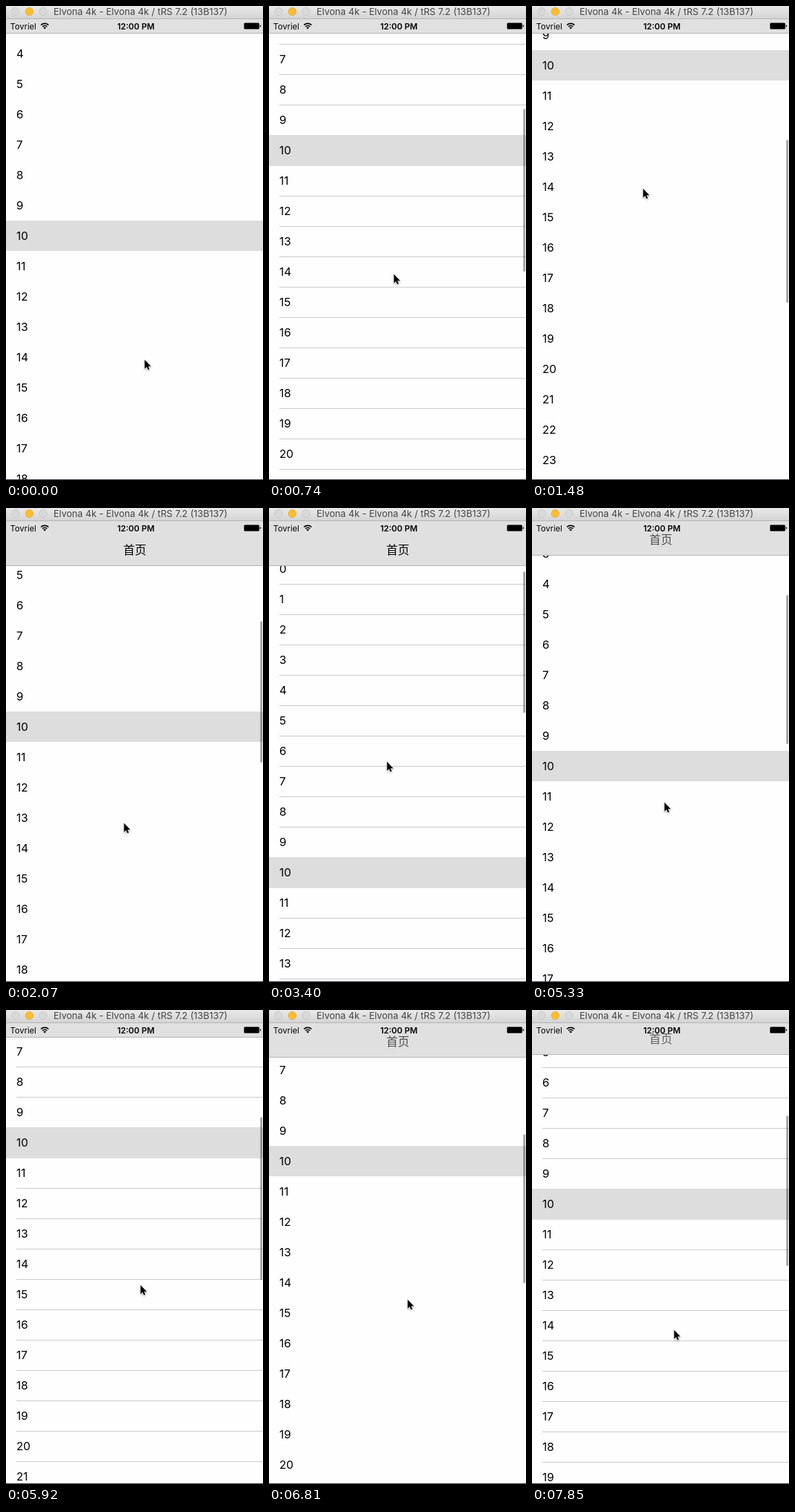
Write an HTML page that moves like this. It is 373 px wide and 687 px high and loops after 8 s.

```html
<!DOCTYPE html>
<html lang="zh">
<head>
<meta charset="utf-8">
<title>List with hiding bar</title>
<style>
  html, body { margin: 0; width: 100%; height: 100%; overflow: hidden; background: #fefefe; }
  body { position: relative; font-family: Inter, Roboto, sans-serif; color: #000; }
  body > *, .row, .home { position: absolute; }
  .row { left: 0; width: 373px; height: 44px; padding-left: 15px; box-sizing: border-box;
         font-size: 16.5px; line-height: 44px; }
  .row.on { background: #ddd; }
  .lined .row::after { content: ""; position: absolute; left: 15px; right: 0; top: 44px;
                       height: 1px; background: #c9c9cb; }
  .lined .row.on { height: 45px; }
  .lined .row.on::after { display: none; }
  #list { left: 0; top: 0; }
  #thumb { left: 369px; top: 0; width: 3px; border-radius: 1.5px; background: rgba(0,0,0,.35); }
  #bar { left: 0; top: -4px; width: 373px; height: 88px; background: #e0e0e0;
         box-sizing: border-box; border-bottom: 1px solid #b2b2b2; }
  .home { left: 0; width: 374px; top: 53px; text-align: center;
          font: 400 16.7px/22px "Noto Sans CJK SC", "Noto Sans CJK", sans-serif; }
  .status { top: 20px; line-height: 19px; font-size: 12px; white-space: nowrap; }
  .clock { left: 138.5px; width: 100px; text-align: center; font-weight: 600; }
  .window { left: 0; top: 0; width: 373px; height: 19px; box-sizing: border-box;
            background: linear-gradient(#e9e9e9, #d4d4d4); border-bottom: 1px solid #b4b4b4; }
  .name { left: 69px; top: 0; line-height: 17px; font-size: 13.5px; color: #444; white-space: nowrap; }
  .edge { left: 0; top: 686px; width: 373px; height: 1px; background: #33333b; }
  svg { left: 0; top: 0; overflow: visible; }
</style>
</head>
<body>
<div id="list"></div>
<div id="thumb"></div>
<div id="bar"><div class="home" id="home">首页</div></div>
<div class="window"></div>
<div class="name">Elvona 4k - Elvona 4k / tRS 7.2 (13B137)</div>
<div class="status" style="left:6px">Tovriel</div>
<div class="status clock">12:00 PM</div>
<div class="edge"></div>
<svg width="373" height="40">
  <g fill="#d9d9d9" stroke="#c2c2c2" stroke-width=".8">
    <circle cx="13.8" cy="8" r="5.6"/>
    <circle cx="33.8" cy="8" r="5.6" fill="#fdbe2f" stroke="#e2a224"/>
    <circle cx="53.8" cy="8" r="5.6"/>
  </g>
  <g fill="none" stroke="#000" stroke-width="1.6">
    <path d="M50.7 27.6a8 8 0 0 1 11 0M52.8 29.9a5 5 0 0 1 6.8 0"/>
    <path d="M56.2 33.6l-2-2.1a3 3 0 0 1 4 0z" fill="#000" stroke="none"/>
  </g>
  <rect x="345.5" y="24.5" width="22" height="9" rx="1.6" stroke="#666" stroke-width=".7"/>
  <path d="M368.6 27.3q1.5 .4 1.5 1.7t-1.5 1.7z"/>
</svg>
<svg id="arrow" width="12" height="18">
  <path d="M0 0V14L3.2 11L5.2 15.8L7.5 14.8L5.5 10.2H9.8Z" transform="translate(.3 .8) scale(.92)"
        stroke="#fff" stroke-width="1.4" paint-order="stroke"
        style="filter:drop-shadow(0 1px 1px rgba(0,0,0,.35))"/>
</svg>
<script>
const LOOP = 8000, TICKS = 54, ROW = 44, ROWS = 40, MARK = 10, BOTTOM = 687;

// turning points: tick, top of the marked row, pointer x, pointer y
const KEYS = [
  [0, 311, 201, 512],
  [10, 64, 161, 264],
  [14, 295, 171, 456],
  [23, 506.5, 171, 367],
  [28, 524, 171, 367],
  [32, 524, 187, 446],
  [40, 170.5, 195, 398],
  [44, 160, 198, 388],
  [50, 302, 206, 506],
  [51, 302, 206, 506],
  [53, 259.5, 206, 463]
];

const el = id => document.getElementById(id);
const list = el('list'), thumb = el('thumb'), bar = el('bar'), home = el('home'), arrow = el('arrow');
const moveTo = (e, x, y) => e.style.transform = `translate(${x}px, ${y}px)`;
const ramp = (t, from, to) => Math.min(1, Math.max(0, (t - from) / (to - from)));

for (let i = 0; i < ROWS; i++) {
  const row = document.createElement('div');
  row.className = i === MARK ? 'row on' : 'row';
  row.style.top = i * ROW + 'px';
  row.textContent = i;
  list.append(row);
}

function slope(n, c) {
  const a = KEYS[n], b = KEYS[n + 1];
  return a && b ? (b[c] - a[c]) / (b[0] - a[0]) : 0;
}

// flat at turning points, flowing through the others
function tangent(n, c) {
  const a = slope(n - 1, c), b = slope(n, c);
  return a * b > 0 ? 2 * a * b / (a + b) : 0;
}

// smooth curve through column c of the keys
function track(t, c) {
  const n = Math.max(1, KEYS.findIndex(k => k[0] >= t)) - 1;
  const a = KEYS[n], b = KEYS[n + 1], d = b[0] - a[0], p = (t - a[0]) / d, q = 1 - p;
  return a[c] + (b[c] - a[c]) * p * p * (3 - 2 * p)
    + d * p * q * (q * tangent(n, c) - p * tangent(n + 1, c));
}

// downward swipes show the bar, upward ones hide it
const shown = t => ramp(t, 12, 14) - ramp(t, 35, 38) + ramp(t, 44, 47) - ramp(t, 51, 55.6);

function draw(tick) {
  const top = Math.round(track(tick, 1) * 2) / 2 - MARK * ROW;
  const shift = Math.round(ROW * (1 - shown(tick)));

  // hairlines only survive at half-pixel scroll positions
  list.className = top % 1 ? 'lined' : '';
  moveTo(list, 0, Math.floor(top));

  const edge = 84 - shift, view = BOTTOM - edge, room = view - 4;
  const scroll = Math.max(0, edge - top), all = ROWS * ROW;
  thumb.style.opacity = tick ? 1 : 0;
  thumb.style.height = Math.round(room * view / all) + 'px';
  moveTo(thumb, 0, Math.round(edge + 2 + scroll * room / all));

  moveTo(bar, 0, -shift);
  home.style.opacity = 1 - shift / ROW;
  moveTo(arrow, Math.round(track(tick, 2)), Math.round(track(tick, 3)));
}

const start = performance.now();
function frame() {
  const t = (performance.now() - start) % LOOP;
  draw(Math.min(TICKS - 1, Math.floor((t + 12) * TICKS / LOOP)));
  requestAnimationFrame(frame);
}
frame();
</script>
</body>
</html>
```
